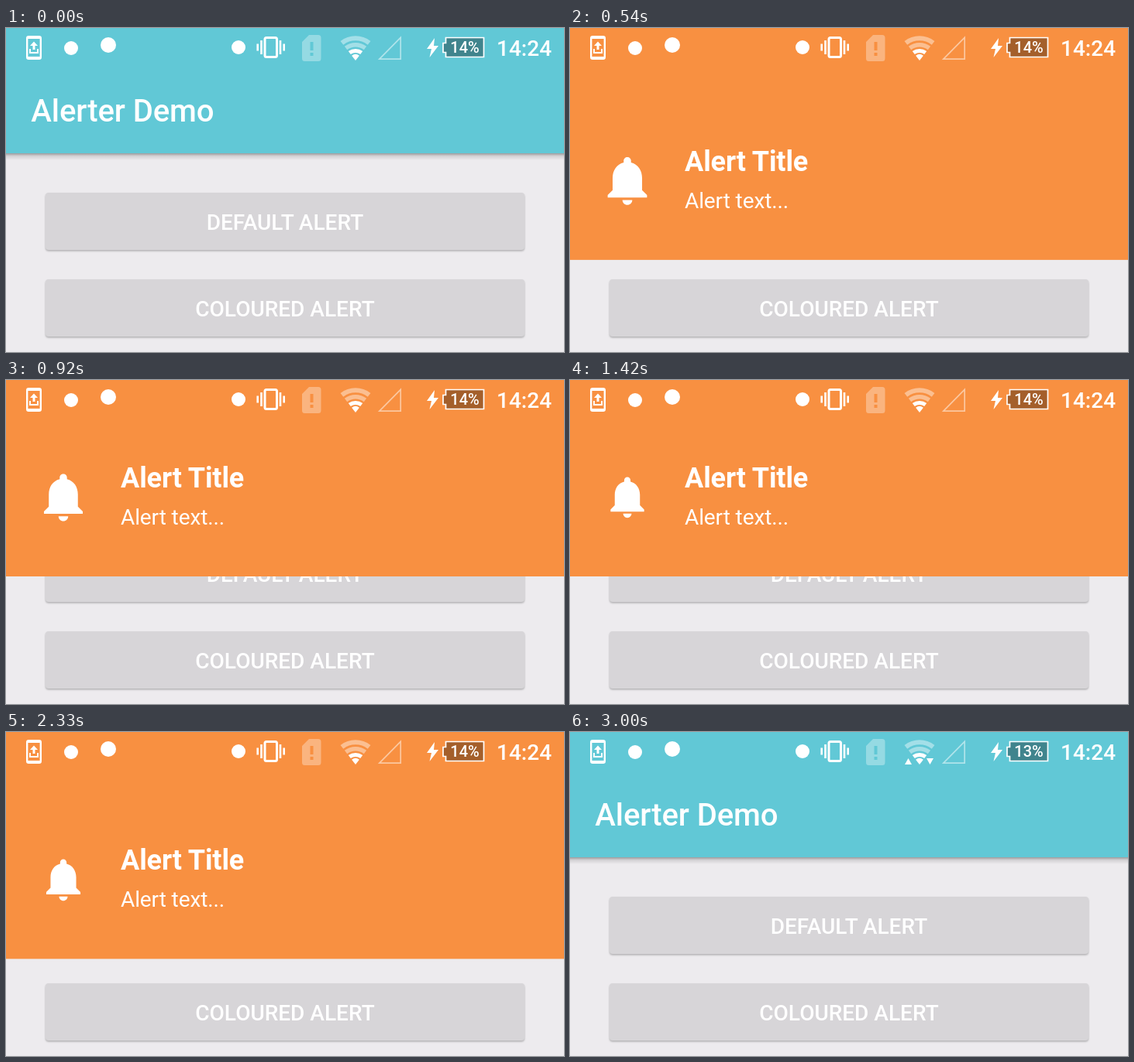
These frames come from a looping animation (720x419 px, 3.04 s). An HTML page:

```html
<!DOCTYPE html>
<html lang="en">
<head>
<meta charset="utf-8">
<title>Alerter Demo</title>
<style>
  html, body { margin: 0; width: 100%; height: 100%; overflow: hidden; background: #edebee; }
  svg { display: block; width: 100vw; height: 100vh; }
  text { font-family: Roboto, "Liberation Sans", sans-serif; font-weight: 500; fill: #fff; }
  .label { font-size: 28px; text-anchor: middle; }
  .tight { letter-spacing: -.1px; }
  .line { fill: none; stroke: #fff; }
</style>
</head>
<body>
<svg viewBox="0 0 720 419" xmlns="http://www.w3.org/2000/svg">
  <defs>
    <linearGradient id="barShadow" x2="0" y2="1">
      <stop offset="0" stop-color="#000" stop-opacity=".34"/>
      <stop offset=".4" stop-color="#000" stop-opacity=".11"/>
      <stop offset="1" stop-color="#000" stop-opacity="0"/>
    </linearGradient>
    <filter id="soft" x="-5%" y="-20%" width="110%" height="140%">
      <feGaussianBlur stdDeviation="1.3"/>
    </filter>
  </defs>

  <rect width="720" height="419" fill="#edebee"/>
  <rect y="162" width="720" height="9" fill="url(#barShadow)"/>
  <rect width="720" height="162" fill="#61c8d6"/>
  <text class="tight" x="32.3" y="121" font-size="40">Alerter Demo</text>
  <g id="buttons"></g>

  <g id="alert">
    <rect y="-300" width="720" height="554" fill="#f89041"/>
    <path id="bell" fill="#fff" d="M12 22c1.1 0 2-.9 2-2h-4c0 1.1.9 2 2 2zm6-6v-5c0-3.07-1.64-5.64-4.5-6.32V4c0-.83-.67-1.5-1.5-1.5s-1.5.67-1.5 1.5v.68C7.63 5.36 6 7.92 6 11v5l-2 2v1h16v-1l-2-2z"/>
    <text class="tight" x="148" y="139" font-size="36" style="font-weight:700">Alert Title</text>
    <text class="tight" x="148" y="187" font-size="28" style="font-weight:400">Alert text...</text>
  </g>

  <g id="status" fill="#fff">
    <rect class="line" x="27.2" y="11.2" width="17.6" height="28.600" rx="2" stroke-width="2.400"/>
    <path d="M28 12h16v2H28zM28 37h16v2H28zM36 17.500l5 5.500h-3.500v5h-3v-5H31z"/>
    <path class="line" d="M31 27v5h10v-5" stroke-width="1.900"/>

    <circle cx="84" cy="26" r="9"/>
    <circle cx="132" cy="22" r="10"/>
    <circle cx="300" cy="25" r="9"/>

    <rect class="line" x="334" y="12.500" width="15.500" height="25" rx="2" stroke-width="3"/>
    <path class="line" d="M329.500 16v18M354 16v18M324.700 20.500v9M358.700 20.500v9" stroke-width="2.600"/>

    <path fill-opacity=".33" fill-rule="evenodd" d="M391 9h12q3.500 0 3.500 3.500v27q0 3.500-3.500 3.500h-17.500q-3.500 0-3.500-3.500V18zM392.500 18v11h4V18zM392.500 32v4h4v-4z"/>

    <g id="wifi"></g>
    <path id="traffic" d="M432 42l4.500-8 4.500 8zM460 34l4.500 8 4.500-8z"/>
    <path class="line" d="M481.800 40.200H509.200V12.300z" stroke-width="1.700" stroke-opacity=".5"/>

    <path d="M553 13l-10 14h6l-2.500 11L558 23h-6z"/>
    <path d="M567.500 12.500h49v25h-49v-6h-3.500v-12h3.500z" fill="#000" fill-opacity=".34" stroke="#fff" stroke-width="1.700"/>
    <text id="charge" x="592" y="32" font-size="20" text-anchor="middle"></text>
    <text x="633" y="36" font-size="28">14:24</text>
  </g>
</svg>
<script>
const LOOP = 3040, FPS = 24;
const TRAVEL = 372, SLIDE = 532, ENTER = 279, EXIT = 2164;
const PULSE = 1100, PULSE_START = ENTER + SLIDE;
const STATUS_CHANGE = 2740;
const $ = id => document.getElementById(id);
const clamp = x => Math.max(0, Math.min(1, x));

const button = (y, label, id) => `
  <rect x="51" y="${y + 1.5}" width="618" height="74" rx="4" fill="#000" opacity=".26" filter="url(#soft)"/>
  <rect x="51" y="${y}" width="618" height="74" rx="4" fill="#d7d5d8"/>
  <rect id="${id}" x="51" y="${y}" width="618" height="74" rx="4" fill="#cfd1cf" opacity="0"/>
  <text class="label" x="360" y="${y + 48}">${label}</text>`;
$("buttons").innerHTML =
  button(213, "DEFAULT ALERT", "press1") + button(325, "COLOURED ALERT", "press2");

// Fan of concentric arcs above a common apex
function arc(radius, width, opacity) {
  const dx = radius * Math.sin(0.66), dy = radius * Math.cos(0.66);
  return `<path class="line" stroke-width="${width}" opacity="${opacity}"
    d="M${451 - dx} ${42 - dy}A${radius} ${radius} 0 0 1 ${451 + dx} ${42 - dy}"/>`;
}
$("wifi").innerHTML =
  arc(28.7, 6, 0.42) + arc(20.3, 5.5, 0.42) + arc(12.6, 5, 1) + arc(4, 8, 1);

const overshoot = p => { const u = p - 1; return u * u * (3 * u + 2); };
const anticipate = p => p * p * (3 * p - 2);

function alertOffset(t) {
  return t < EXIT
    ? TRAVEL * overshoot(clamp((t - ENTER) / SLIDE))
    : -TRAVEL * anticipate(clamp((t - EXIT) / SLIDE));
}

function bellScale(t) {
  const phase = Math.max(0, t - PULSE_START) / PULSE;
  return 1 - 0.075 * (1 - Math.cos(2 * Math.PI * phase));
}

function render(t) {
  $("alert").setAttribute("transform", `translate(0 ${alertOffset(t).toFixed(2)})`);
  $("bell").setAttribute("transform",
    `translate(74 151.2) scale(${(3.17 * bellScale(t)).toFixed(4)}) translate(-12 -12)`);
  $("press2").setAttribute("opacity", Math.min(clamp((t - 80) / 170), clamp((540 - t) / 140)));
  $("traffic").setAttribute("visibility", t < STATUS_CHANGE ? "hidden" : "visible");
  $("charge").textContent = t < STATUS_CHANGE ? "14%" : "13%";
}

const origin = performance.now();
function tick() {
  const elapsed = (performance.now() - origin) % LOOP;
  const step = Math.min(72, Math.floor((elapsed + 6) * FPS / 1000));
  render(step * 1000 / FPS);
  requestAnimationFrame(tick);
}
tick();
</script>
</body>
</html>
```
